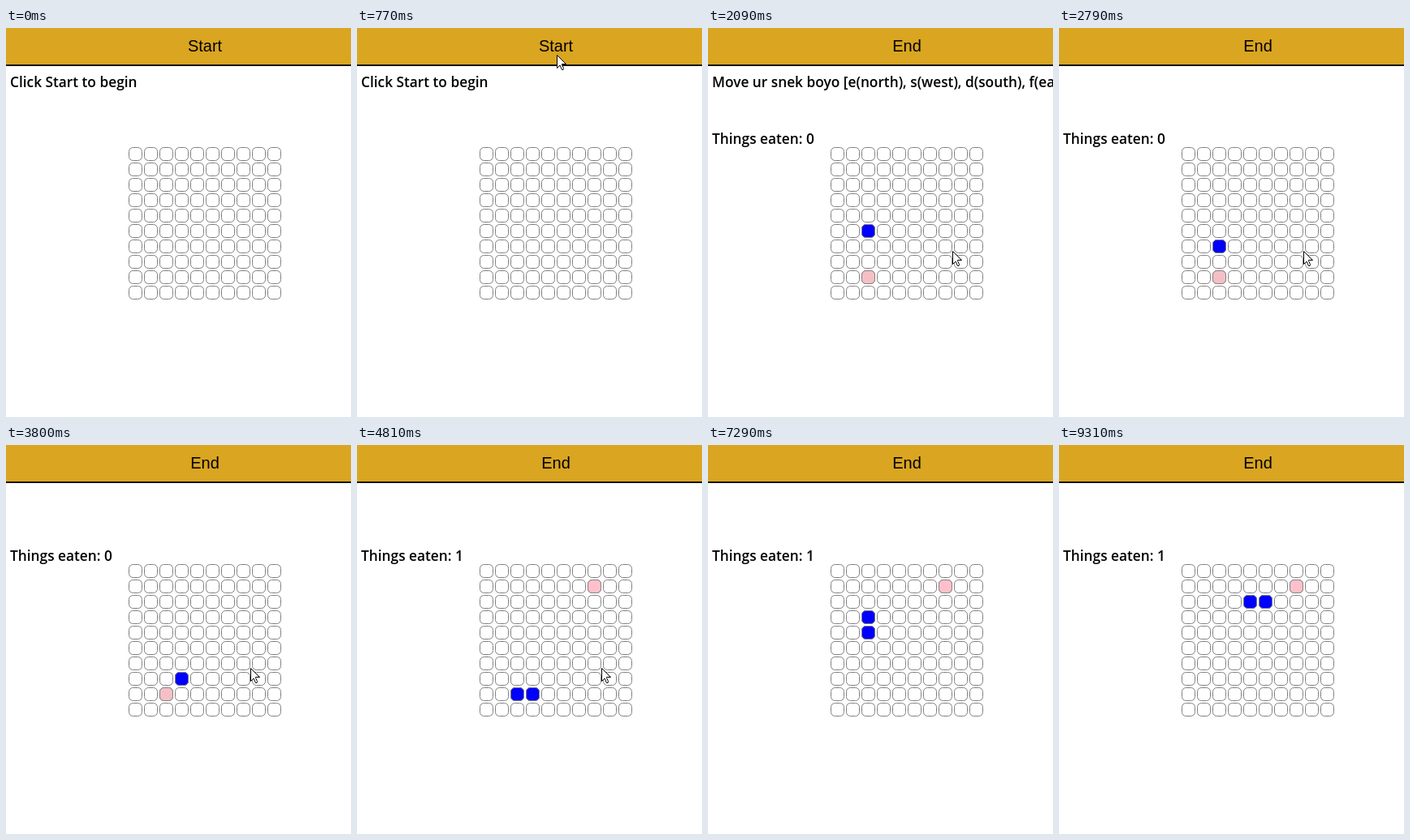
An HTML page with a canvas that plays this animation: 425 px wide and 480 px high, repeating every 9390 ms.

```html
<!DOCTYPE html>
<html lang="en">
<head>
<meta charset="utf-8">
<title>Snake game</title>
<style>
  html, body { margin: 0; width: 425px; height: 480px; overflow: hidden; background: #fff; }
  canvas { display: block; }
</style>
</head>
<body>
<canvas id="stage" width="425" height="480"></canvas>
<script>
const ctx = document.getElementById('stage').getContext('2d');
const LOOP = 9390, FRAME = 77.6, CLICK = 850, FIRST_MOVE = 2780;
const FRAMES_PER_TICK = 6.42, TICK_PHASE = 0.26;

const START = [2, 5], ROUTE = 'SESSWNNNNNNEEE', EAT_TICK = 4;
const STEP = { N: [0, -1], E: [1, 0], S: [0, 1], W: [-1, 0] };

// Pointer tip: time, x, y; it moves straight between these points
const pointerKeys = [
  [70, 358, 417], [770, 246, 33], [1010, 246, 33], [1400, 218, 253],
  [2090, 301, 275], [4890, 301, 275], [5820, 299, 275], [6280, 432, 460]
];
const arrow = new Path2D('M.5 .5V16.5L4 13L6.5 18.5H8L8.5 16.5L6.5 12.5V11.5H11.5Z');

// Game ticks run on their own timer and show up on the next whole frame
function tickAt(t) {
  const frame = Math.floor((t - FIRST_MOVE) / FRAME);
  return Math.ceil((frame + TICK_PHASE) / FRAMES_PER_TICK) - 1;
}

function headAt(tick) {
  let [col, row] = START;
  for (const dir of ROUTE.slice(0, Math.max(0, tick + 1))) {
    col += STEP[dir][0];
    row += STEP[dir][1];
  }
  return [col, row];
}

function text(str, x, y, font, align = 'left') {
  ctx.font = font;
  ctx.textAlign = align;
  ctx.fillStyle = '#000';
  ctx.fillText(str, x, y);
}

const label = (str, y) => text(str, 5, y, '600 17.3px "Open Sans", "Noto Sans", sans-serif');

function cell([col, row], fill) {
  ctx.beginPath();
  ctx.roundRect(151.5 + 19 * col, 147.5 + 19 * row, 16, 16, 5);
  ctx.fillStyle = fill;
  ctx.fill();
  ctx.strokeStyle = '#808080';
  ctx.stroke();
}

function drawPointer(t) {
  const next = pointerKeys.findIndex(key => key[0] > t);
  if (next < 1) return;
  const [t0, x0, y0] = pointerKeys[next - 1], [t1, x1, y1] = pointerKeys[next];
  const p = Math.floor((t - t0) / FRAME) * FRAME / (t1 - t0);
  ctx.save();
  ctx.translate(Math.round(x0 + (x1 - x0) * p), Math.round(y0 + (y1 - y0) * p));
  ctx.fillStyle = '#fff';
  ctx.fill(arrow);
  ctx.strokeStyle = '#000';
  ctx.stroke(arrow);
  ctx.restore();
}

function drawHeader(playing) {
  ctx.fillStyle = '#daa520';
  ctx.fillRect(0, 0, 425, 45);
  ctx.fillStyle = '#111';
  ctx.fillRect(0, 45, 425, 2);
  text(playing ? 'End' : 'Start', 245, 29, '20px "Liberation Sans", Arial, sans-serif', 'center');
}

function draw(t) {
  const playing = t >= CLICK, tick = tickAt(t), fed = tick >= EAT_TICK;
  ctx.fillStyle = '#fff';
  ctx.fillRect(0, 0, 425, 480);
  drawHeader(playing);

  if (!playing) label('Click Start to begin', 73);
  else if (tick < -1) label('Move ur snek boyo [e(north), s(west), d(south), f(east)]', 73);
  if (playing) label('Things eaten: ' + Number(fed), 143);

  for (let i = 0; i < 100; i++) cell([i % 10, Math.floor(i / 10)], '#fff');
  if (fed) cell([7, 1], '#ffc0cb');
  else if (playing) cell(headAt(EAT_TICK), '#f4c0c6');
  if (tick >= -2) cell(headAt(tick), '#00f');
  if (fed) cell(headAt(tick - 1), '#00f');
  drawPointer(t);
}

const start = performance.now();
function loop() {
  draw((performance.now() - start) % LOOP);
  requestAnimationFrame(loop);
}
loop();
</script>
</body>
</html>
```
